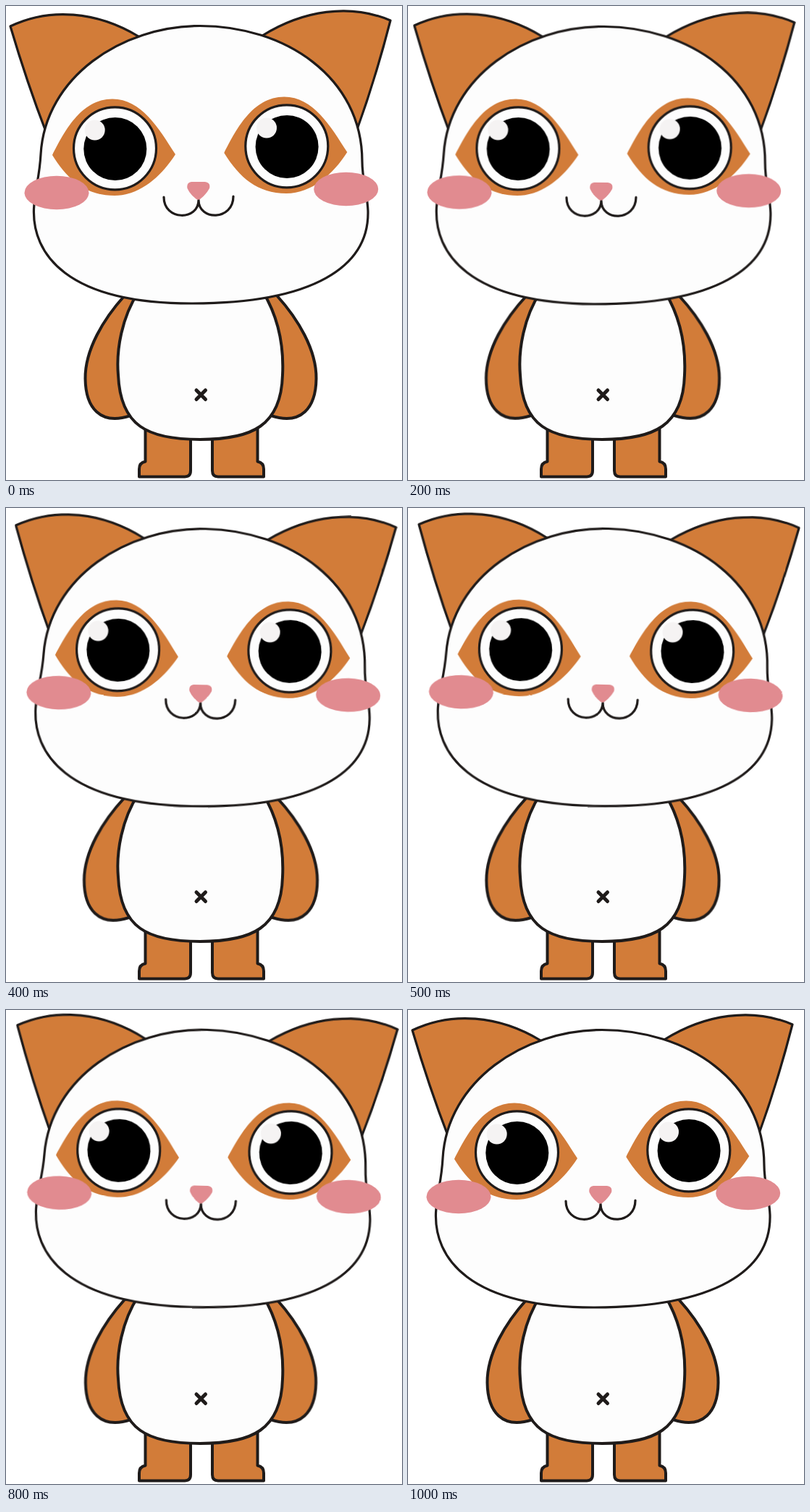
Recreate the animation shown at these times as an HTML page. Size 547 by 655 pixels, loop 1100 ms.

```html
<!DOCTYPE html>
<html lang="en">
<head>
<meta charset="utf-8">
<title>Swaying cat</title>
<style>
  html, body { margin: 0; width: 100%; height: 100%; overflow: hidden; background: #fff; }
  svg { display: block; width: 547px; height: 655px; }

  .ink { stroke: #1f1b1a; stroke-width: 3.2; stroke-linejoin: round; stroke-linecap: round; }
  .thick { stroke-width: 4; }
  .fur { fill: #d27c39; }
  .white { fill: #fdfdfd; }
  .pink { fill: #e18b90; }
  .line { fill: none; }

  .head { transform-origin: 269px 395px; animation: sway 1.1s step-end infinite; }
  .arm { transform-origin: 168px 403px; animation: swing 1.1s step-end infinite; }

  /* eleven held poses; the first and last are the same */
  @keyframes sway {
    0%     { transform: none; }
    9.09%  { transform: translateY(.6px) rotate(.12deg); }
    18.18% { transform: translateY(.9px) rotate(.42deg); }
    27.27% { transform: translateY(1.2px) rotate(.82deg); }
    36.36% { transform: translateY(1.3px) rotate(1.18deg); }
    45.45% { transform: translateY(1px) rotate(1.4deg); }
    54.54% { transform: translateY(.7px) rotate(1.48deg); }
    63.63% { transform: translateY(.2px) rotate(1.52deg); }
    72.72% { transform: translateY(-.2px) rotate(1.5deg); }
    81.81% { transform: rotate(.6deg); }
    90.9%, 100% { transform: none; }
  }
  @keyframes swing {
    0%     { transform: none; }
    9.09%  { transform: rotate(.5deg); }
    18.18% { transform: rotate(.8deg); }
    27.27% { transform: rotate(.9deg); }
    36.36% { transform: rotate(.8deg); }
    45.45% { transform: rotate(.6deg); }
    54.54% { transform: rotate(.2deg); }
    63.63% { transform: rotate(-.1deg); }
    72.72% { transform: rotate(-.2deg); }
    81.81% { transform: rotate(-.2deg); }
    90.9%, 100% { transform: none; }
  }
</style>
</head>
<body>
<svg viewBox="0 0 547 655">
  <defs>
    <path id="leg" class="fur ink thick" d="M192.5 575 V629.5 Q184 631 184 640 V650.5 H247 Q255 650.5 255 642 V575Z"/>
    <path id="arm" class="fur ink thick" d="M164 400 C135 432 109 475 109.5 515 C110 555 130 580 172 566 L205 560 V400Z"/>
    <g id="eye">
      <path class="fur" d="M64 206 C80 175 103 128.5 147 128.5 C187 128.5 211 169 234 205 C215 235 185 262 150 262 C110 262 85 240 64 206Z"/>
      <circle class="white ink" cx="150.5" cy="196.8" r="57"/>
      <circle cx="150.8" cy="197.5" r="43.5"/>
      <circle cx="122.7" cy="171.5" r="14" fill="#f5f3f3"/>
    </g>
  </defs>

  <use href="#leg"/>
  <use href="#leg" transform="translate(540) scale(-1 1)"/>
  <g class="arm"><use href="#arm"/></g>
  <g transform="translate(538) scale(-1 1)">
    <g class="arm"><use href="#arm"/></g>
  </g>
  <path class="white ink thick" d="M183 395 C160 430 152 475 155 510 C158 580 195 599 268 599 C340 599 380 580 382 510 C384 470 376 430 355 395Z"/>
  <path class="ink line" style="stroke-width:5" d="M263 531 l12.5 12.5 m0 -12.5 l-12.5 12.5"/>

  <g class="head">
    <path class="fur ink" d="M56 176 Q29 106 6 28 C60 2 125 7 183 42 L120 110Z"/>
    <path class="fur ink" d="M483 176 Q510 102 531 20 C475 -4 410 6 354 41 L420 110Z"/>
    <path class="white ink" d="M268 27.5 C160 27.5 54 98 48 205 C46 240 40 250 38.5 280 C36 342 83 411 256 411 C425 411 502 360 500 283 C499 258 492 240 492 215 C492 98 385 27.5 268 27.5Z"/>
    <use href="#eye"/>
    <use href="#eye" x="237.3" y="-3"/>
    <ellipse class="pink" cx="70" cy="258" rx="44.5" ry="23.3"/>
    <ellipse class="pink" cx="469.7" cy="253" rx="44.5" ry="23.3"/>
    <path class="ink line" d="M218 264 C218 297 266 297 266 268 C266 297 314 297 314 263"/>
    <path class="pink" d="M256 243 H275 Q283 244 281 252 Q276 261 268 267 Q265.5 268.5 263 267 Q254 260 250.5 252 Q249 244 256 243Z"/>
  </g>
</svg>
</body>
</html>
```
